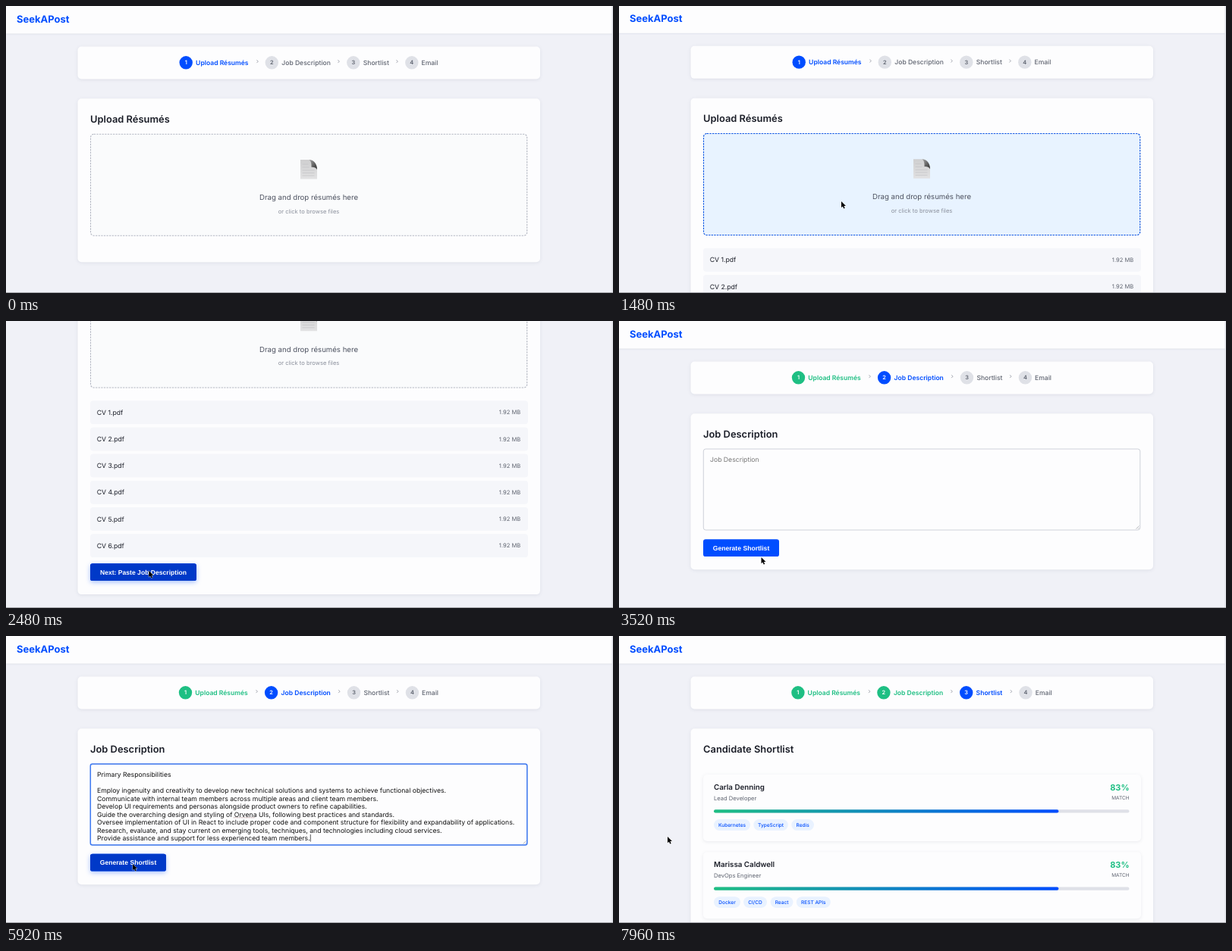
Recreate the animation shown at these times as an HTML page. Size 800 by 379 pixels, loop 8000 ms.

```html
<!DOCTYPE html>
<html lang="en">
<head>
<meta charset="utf-8">
<title>Résumé shortlist</title>
<style>
html, body { margin: 0; width: 100%; height: 100%; overflow: hidden; background: #f0f1f7; }
svg { display: block; width: 100vw; height: 100vh; }
text { font-family: Inter, sans-serif; text-rendering: geometricPrecision; white-space: pre; }
.btn text { font-family: "Liberation Sans", Arial, sans-serif; }
.card { fill: #fdfdfe; filter: drop-shadow(0 1px 2px rgba(30, 40, 80, .09)); }
</style>
</head>
<body>
<svg id="stage" viewBox="0 0 800 379" xmlns="http://www.w3.org/2000/svg"></svg>
<script>
const LOOP = 8000;
const BLUE = '#004dff', GREEN = '#1ebf83', INK = '#1b1e28', GRAY = '#5f6470';

// Text is placed by the middle of its capitals.
const text = (x, mid, size, str, fill = INK, weight = 400, anchor = 'start') =>
  `<text x="${x}" y="${(mid + size * 0.36).toFixed(2)}" font-size="${size}" fill="${fill}" font-weight="${weight}" text-anchor="${anchor}">${str}</text>`;
const rect = (x, y, w, h, r, attrs) =>
  `<rect x="${x}" y="${y}" width="${w}" height="${h}" rx="${r}" ${attrs}/>`;
const card = (y, h, id = '') => rect(94.5, y, 609.5, h, 5, `class="card" ${id}`);
const title = str => text(111, 149.4, 12.9, str, INK, 600);

function steps(active, circles, labels, arrows) {
  const names = ['Upload Résumés', 'Job Description', 'Shortlist', 'Email'];
  const items = names.map((name, i) => {
    const color = i < active ? GREEN : i === active ? BLUE : '#dfe1e7';
    const on = i <= active;
    return `<circle cx="${circles[i]}" cy="74.8" r="8.7" fill="${color}"/>` +
      text(circles[i], 74.8, 7.4, i + 1, on ? '#fff' : GRAY, 600, 'middle') +
      text(labels[i], 74.8, 8.55, name, on ? color : GRAY, on ? 600 : 500);
  });
  const marks = arrows.map(x =>
    `<path d="M${x - 0.8} 71.3l1.8 1.9-1.8 1.9" fill="none" stroke="#9a9ea8" stroke-width=".9"/>`);
  return card(53.5, 43) + items.join('') + marks.join('');
}

function button(id, y, w, label) {
  const face = fill => rect(111, y, w, 22.8, 3.2, `fill="${fill}"`);
  return `<g class="btn" id="${id}">${face(BLUE)}<g class="over" style="filter:drop-shadow(0 2px 3px rgba(0,77,255,.35))">${face('#0039c8')}</g>` +
    text(111 + w / 2, y + 11.3, 8.6, label, '#fff', 700, 'middle') + '</g>';
}

const zone = (fill, stroke, attrs) =>
  rect(111.5, 169.2, 575.2, 134, 4.3, `fill="${fill}" stroke="${stroke}" stroke-width="1.1" stroke-dasharray="2.3 1.3" ${attrs}`);

const icon = `<path d="M388 203h13l9 9.5V228.500h-22z" fill="url(#paper)"/>
  <path d="M399.500 203c5 0 10.500 4 10.500 13-1.500-2.500-4-3.500-7.500-3.200 .3-4.800-.5-8-3-9.800z" fill="url(#fold)"/>
  <path d="M390.500 209h8M390.500 213h9M390.500 217h16M390.500 220.500h16M390.500 224h16" stroke="#c2c2c4" stroke-width=".7"/>`;

function fileRow(i) {
  const y = 320.4 + i * 35.2;
  return rect(111, y, 577, 31, 4, 'fill="#f5f6fa"') +
    text(119.7, y + 15.5, 8.67, `CV ${i + 1}.pdf`, INK) +
    text(678.3, y + 15.5, 7.58, '1.92 MB', GRAY, 400, 'end');
}

const uploadPage =
  steps(0, [237.2, 350.3, 457.8, 534.8], [250.1, 363.3, 470.8, 547.5], [331.3, 438.3, 515.3]) +
  card(122.3, 216, 'id="panel"') + title('Upload Résumés') +
  zone('#fafbfc', '#b3b7c2', '') + zone('#e8f3ff', '#0a55e6', 'id="zoneOver"') + icon +
  text(399, 252.6, 9.65, 'Drag and drop résumés here', '#4d5260', 400, 'middle') +
  text(399, 270.8, 7.58, 'or click to browse files', '#8b909c', 400, 'middle') +
  `<g id="files">${[0, 1, 2, 3, 4, 5].map(fileRow).join('')}${button('next', 536, 140, 'Next: Paste Job Description')}</g>`;

const duties = [
  'Primary Responsibilities', '',
  'Employ ingenuity and creativity to develop new technical solutions and systems to achieve functional objectives.',
  'Communicate with internal team members across multiple areas and client team members.',
  'Develop UI requirements and personas alongside product owners to refine capabilities.',
  'Guide the overarching design and styling of Orvena UIs, following best practices and standards.',
  'Oversee implementation of UI in React to include proper code and component structure for flexibility and expandability of applications.',
  'Research, evaluate, and stay current on emerging tools, techniques, and technologies including cloud services.',
  'Provide assistance and support for less experienced team members.'
];

const jobPage =
  steps(1, [236.5, 349.6, 458.5, 535.4], [249.3, 362.6, 471.4, 548.1], [330.4, 439, 516]) +
  card(122.3, 206) + title('Job Description') +
  rect(111.3, 169, 575.5, 107, 3, 'fill="#fdfdfe" stroke="#c3c7d0" stroke-width=".8"') +
  rect(111.3, 169, 575.5, 107, 2.5, 'id="focus" fill="none" stroke="#3f7af2" stroke-width="1.5"') +
  '<path d="M681.500 274.500l4-4M684 274.500l1.500-1.500" stroke="#8d9097" stroke-width=".6"/>' +
  `<g id="hint">${text(120, 183, 8.67, 'Job Description', '#757575')}</g>` +
  `<g id="duties">${duties.map((d, i) => text(120, 183 + i * 10.5, 8.67, d, '#111')).join('')}</g>` +
  '<path id="spell" d="M300 239.800h28" stroke="#aa8888" stroke-width=".9" stroke-dasharray="1.3 1"/>' +
  '<path id="caret" stroke="#111" stroke-width=".7"/>' +
  button('generate', 288.3, 100, 'Generate Shortlist');

function candidate(y, name, role, chips) {
  const tags = chips.map(([x, w, label]) =>
    rect(x, y + 59, w, 14.8, 7.4, 'fill="#e9f2ff"') +
    text(x + w / 2, y + 66.4, 6.55, label, BLUE, 500, 'middle')).join('');
  return rect(111, y, 577, 88, 5, 'class="card"') +
    text(125, y + 16, 9.76, name, INK, 600) +
    text(125, y + 31.5, 7.58, role, GRAY) +
    text(672.6, y + 16.7, 11, '83%', GREEN, 700, 'end') +
    text(672.6, y + 30.2, 6.5, 'MATCH', GRAY, 400, 'end') +
    rect(125, y + 46.3, 547.5, 4.3, 2.15, 'fill="#dfe1e8"') +
    rect(125, y + 46.3, 547.5 * 0.83, 4.3, 2.15, 'fill="url(#match)"') + tags;
}

const listPage =
  steps(2, [235.9, 348.9, 457.7, 536], [248.6, 361.9, 470.6, 548.8], [329.8, 438.3, 516.7]) +
  card(122.3, 400) + title('Candidate Shortlist') +
  candidate(183, 'Carla Denning', 'Lead Developer',
    [[125, 48, 'Kubernetes'], [177.3, 45.5, 'TypeScript'], [227.3, 29.7, 'Redis']]) +
  candidate(285.2, 'Marissa Caldwell', 'DevOps Engineer',
    [[125, 35, 'Docker'], [164, 31, 'CI/CD'], [199.700, 29.8, 'React'], [233.800, 45, 'REST APIs']]);

const stops = (a, b) => `<stop stop-color="${a}"/><stop offset="1" stop-color="${b}"/>`;
document.getElementById('stage').innerHTML = `
  <defs>
    <linearGradient id="match">${stops(GREEN, BLUE)}</linearGradient>
    <linearGradient id="paper" x2="0" y2="1">${stops('#cfcfd0', '#e2e2e3')}</linearGradient>
    <linearGradient id="fold" y2="1">${stops('#a5a5a5', '#2c2c2c')}</linearGradient>
  </defs>
  <rect width="800" height="379" fill="#f0f1f7"/>
  <g id="page">
    <rect width="800" height="36.500" fill="#fdfdfe" style="filter:drop-shadow(0 .6px 1px rgba(30,40,80,.16))"/>
    ${text(14, 17.3, 13, 'SeekAPost', BLUE, 700)}
    <g id="upload">${uploadPage}</g><g id="job">${jobPage}</g><g id="list">${listPage}</g>
  </g>
  <rect x="798.500" width="1.500" height="379" fill="#dddfe5"/>
  <rect y="378" width="800" height="1" fill="#a5a6ab"/>
  <rect id="bar" x="796" width="3.300" height="241" rx="1.600" fill="#77787c"/>
  <path id="cursor" d="M0 0V8.300L1.900 6.600 3.200 9.600 4.700 8.900 3.400 6.100H6z" fill="#000" stroke="#fff" stroke-width=".7" paint-order="stroke"/>`;

const $ = id => document.getElementById(id);
const clamp = v => Math.min(1, Math.max(0, v));
const ramp = (t, a, b) => clamp((t - a) / (b - a));
const pulse = (t, on, off, d = 160) => ramp(t, on, on + d) - ramp(t, off, off + d);
const smooth = p => p * p * (3 - 2 * p);
const cubic = p => p < 0.5 ? 4 * p ** 3 : 1 - 4 * (1 - p) ** 3;
const show = (id, on) => { $(id).style.display = on ? '' : 'none'; };

// Pointer stops: time, x, y
const path = [
  [200, -8, 320], [900, 293, 258], [1880, 293, 258], [2500, 188, 330], [2900, 188, 330],
  [3200, 187.5, 312], [3520, 187.5, 312], [3760, 210, 214], [4770, 210, 214],
  [5720, 167, 301], [6500, 167, 301], [7240, 64, 265], [8000, 64, 265]
];

function pointer(t) {
  const i = path.findIndex(p => p[0] > t);
  if (i < 1) return path[0].slice(1);
  const [a, b] = [path[i - 1], path[i]];
  const p = smooth(ramp(t, a[0], b[0]));
  return [a[1] + (b[1] - a[1]) * p, a[2] + (b[2] - a[2]) * p];
}

function hover(id, amount) {
  $(id).querySelector('.over').style.opacity = amount;
  $(id).setAttribute('transform', `translate(0 ${-0.5 * amount})`);
}

const DROP = 1000, TO_JOB = 2760, FOCUS = 4000, PASTE = 4460, SEND = 6300, TO_LIST = 7480;

function draw(t) {
  show('upload', t < TO_JOB);
  show('job', t >= TO_JOB && t < TO_LIST);
  show('list', t >= TO_LIST);

  const scrolled = t < TO_JOB ? cubic(ramp(t, 1450, 1790)) : 0;
  $('page').setAttribute('transform', `translate(0 ${-215.2 * scrolled})`);
  $('bar').setAttribute('y', 2 + 133 * scrolled);
  $('bar').style.opacity = pulse(t, 1480, 2300);

  show('files', t >= DROP);
  $('panel').setAttribute('height', t < DROP ? 216 : 454);
  $('zoneOver').style.opacity = pulse(t, 510, 1860, 200);
  hover('next', ramp(t, 2300, 2460));

  const focused = t >= FOCUS && t < SEND, pasted = t >= PASTE;
  show('hint', !pasted);
  show('duties', pasted);
  show('spell', t >= 5000);
  $('focus').style.opacity = pulse(t, FOCUS, SEND, 120);
  const blink = (t - (pasted ? PASTE : FOCUS)) % 1000 < 500;
  show('caret', focused && blink);
  $('caret').setAttribute('d', pasted ? 'M401.300 262v9.500' : 'M120.300 178v9.500');
  hover('generate', pulse(t, 5600, 6680));

  const [x, y] = pointer(t);
  $('cursor').setAttribute('transform', `translate(${x} ${y})`);
}

function frame() {
  draw(performance.now() % LOOP);
  requestAnimationFrame(frame);
}
frame();
</script>
</body>
</html>
```
